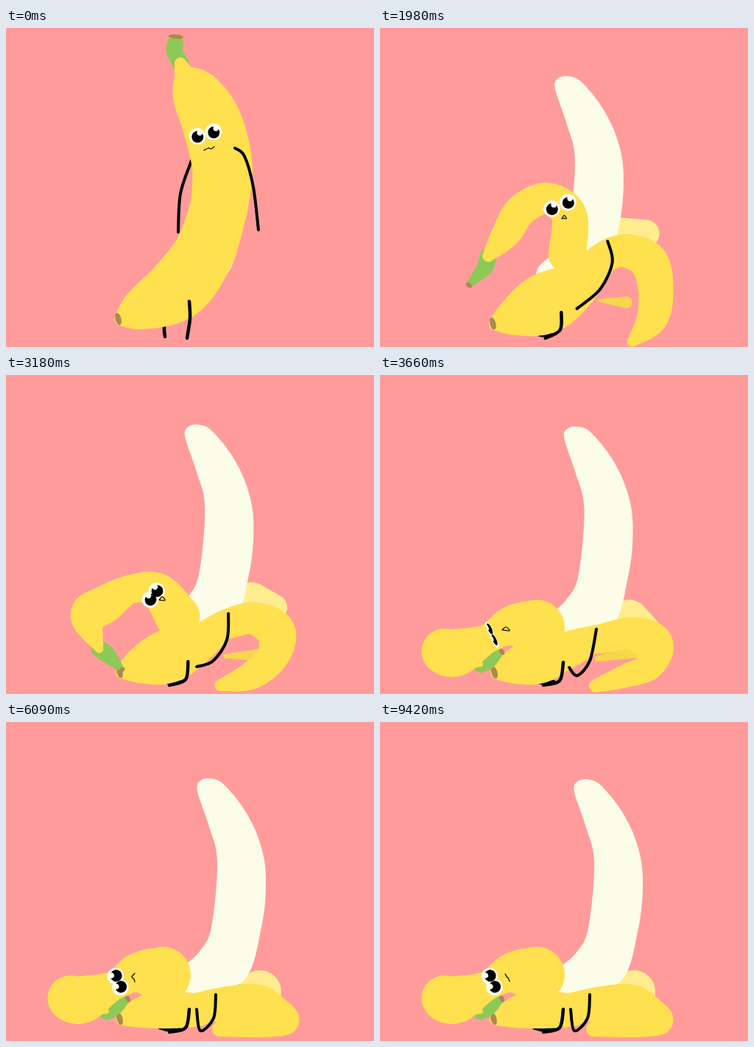
Animation, 500 px wide and 433 px high, one loop 9450 ms. Source, as an HTML page:

```html
<!DOCTYPE html>
<html lang="en">
<head>
<meta charset="utf-8">
<title>Banana</title>
<style>
html, body { margin: 0; width: 100%; height: 100%; overflow: hidden; background: #ff9c9b; }
svg { display: block; width: 100vw; height: 100vh; }
</style>
</head>
<body>
<svg id="stage" viewBox="0 0 500 433"></svg>
<script>
const LOOP = 9450;
const OPEN = 1350, HANG = 2150, DROP = 2850, FALL = 3550, REST = 3720, SETTLE = 5700;
const YELLOW = '#ffe04f', CREAM = '#fbfde9', BROWN = '#a98a50';
const stage = document.getElementById('stage');
const updates = [];

const numbers = text => String(text).match(/-?[\d.]+/g).map(Number);
const degrees = angle => angle * 180 / Math.PI;

function add(tag, attrs) {
  const el = document.createElementNS('http://www.w3.org/2000/svg', tag);
  for (const name in attrs) el.setAttribute(name, attrs[name]);
  return stage.appendChild(el);
}

// Monotone Hermite track: passes smoothly through keys, rests on repeated ones.
function track(keys, parse = numbers) {
  const times = keys.map(k => k[0]);
  const values = keys.map(k => parse(k[1]));
  const last = keys.length - 1;
  const slope = (i, c) => (values[i + 1][c] - values[i][c]) / (times[i + 1] - times[i]);
  const tangent = (i, c) => {
    if (i === 0 || i === last) return 0;
    const a = slope(i - 1, c), b = slope(i, c);
    return a * b <= 0 ? 0 : 2 * a * b / (a + b);
  };
  return t => {
    if (t <= times[0]) return values[0];
    if (t >= times[last]) return values[last];
    const i = times.findIndex(v => v > t) - 1;
    const span = times[i + 1] - times[i], u = (t - times[i]) / span;
    const h = u * u * (3 - 2 * u);
    return values[i].map((v, c) => v + (values[i + 1][c] - v) * h
      + span * u * (1 - u) * ((1 - u) * tangent(i, c) - u * tangent(i + 1, c)));
  };
}

// The story in four poses: whole, hanging open, fallen, settled.
function poses([whole, hang, fallen, settled = fallen], parse) {
  return track([[OPEN, whole], [HANG, hang], [DROP, hang],
    [FALL, fallen], [REST, fallen], [SETTLE, settled]], parse);
}

// A spine of "x,y,radius" joints is blended as lengths and turns, so that peels swing.
function toJoints(text) {
  const v = numbers(text), joints = v.slice(0, 3);
  for (let i = 3, heading = 0; i < v.length; i += 3) {
    const dx = v[i] - v[i - 3], dy = v[i + 1] - v[i - 2];
    const turn = Math.atan2(dy, dx) - heading;
    const wrapped = Math.atan2(Math.sin(turn), Math.cos(turn));
    heading += wrapped;
    joints.push(Math.hypot(dx, dy), wrapped, v[i + 2]);
  }
  return joints;
}

function toSpine(joints) {
  let [x, y, r] = joints, heading = 0;
  const spine = [[x, y, r]];
  for (let i = 3; i < joints.length; i += 3) {
    heading += joints[i + 1];
    x += joints[i] * Math.cos(heading);
    y += joints[i] * Math.sin(heading);
    spine.push([x, y, joints[i + 2]]);
  }
  return spine;
}

function chain(...list) {
  const pose = poses(list, toJoints);
  return t => toSpine(pose(t));
}

// Catmull-Rom point between knots i and i + 1.
function between(knots, i, u) {
  const at = k => knots[Math.max(0, Math.min(knots.length - 1, k))];
  const [a, b, c, d] = [at(i - 1), at(i), at(i + 1), at(i + 2)];
  return b.map((v, k) => v + u / 2 * (c[k] - a[k]
    + u * (2 * a[k] - 5 * v + 4 * c[k] - d[k] + u * (3 * (v - c[k]) + d[k] - a[k]))));
}

// Fills the area a circle covers while it runs along a spine.
function sweep(fill, spineAt) {
  const el = add('path', { fill }), steps = 18;
  updates.push(t => {
    const spine = spineAt(t);
    let d = '';
    for (let s = 0; s <= (spine.length - 1) * steps; s++) {
      const i = Math.min(Math.floor(s / steps), spine.length - 2);
      const [x, y, radius] = between(spine, i, s / steps - i);
      const r = Math.max(1, radius);
      d += `M${x - r} ${y}a${r} ${r} 0 1 0 ${2 * r} 0a${r} ${r} 0 1 0 ${-2 * r} 0`;
    }
    el.setAttribute('d', d);
  });
}

function curve(flat, closed) {
  const n = flat.length / 2;
  const at = i => {
    const k = closed ? (i + n) % n : Math.max(0, Math.min(n - 1, i));
    return [flat[2 * k], flat[2 * k + 1]];
  };
  let d = 'M' + at(0);
  for (let i = 0; i < (closed ? n : n - 1); i++) {
    const [a, b, c, e] = [at(i - 1), at(i), at(i + 1), at(i + 2)];
    d += `C${b.map((v, k) => v + (c[k] - a[k]) / 6)} ${c.map((v, k) => v - (e[k] - b[k]) / 6)} ${c}`;
  }
  return d;
}

function line(width, pose) {
  const el = add('path', { fill: 'none', stroke: '#000', 'stroke-width': width,
    'stroke-linecap': 'round', 'stroke-linejoin': 'round' });
  updates.push(t => el.setAttribute('d', curve(pose(t))));
}

function cap(ovalAt) {
  const el = add('ellipse', { fill: BROWN });
  updates.push(t => {
    const [x, y, rx, ry, turn] = ovalAt(t);
    el.setAttribute('rx', rx);
    el.setAttribute('ry', ry);
    el.setAttribute('transform', `translate(${x} ${y}) rotate(${turn})`);
  });
}

const body = chain(
  '156,395,9 187,380,29 234,353,43 270,303,41 289,245,39',
  '157,402,9 185,392,26 224,376,41 264,357,29 300,335,12',
  '159,404,9 185,395,24 215,388,31 245,377,26 275,365,22',
  '158,403,9 185,394,21 215,390,26 245,391,24 262,391,22');

// Head peel: six joints of skin, then two of stem
const head = chain(
  '289,245,39 294,190,41 281,132,41 261,92,34 245,68,16 237,48,8 229,32,11 230,21,11',
  '250,315,24 252,262,22 222,244,19 192,266,20 180,303,20 164,341,8 164,357,11 152,385,4',
  '213,343,38 180,340,27 146,358,20 103,377,32 88,375,27 137,393,3 148,387,11 162,378,5');

const frontPeel = chain(
  '270,285,8 279,262,20 290,225,22 293,190,26 290,155,24 280,125,21 258,95,7',
  '272,333,8 300,322,20 332,314,22 362,335,26 359,372,24 335,410,21 294,422,7',
  '262,362,16 300,358,20 340,351,22 371,365,27 366,395,19 335,408,16 293,422,9',
  '258,390,22 300,382,23 340,383,27 365,395,23 378,405,20 345,402,26 290,417,10');

const backPeel = chain('300,250,20 300,220,18', '330,283,22 364,290,19',
  '338,333,28 365,345,16', '345,366,29 352,366,22');
const darkTip = chain('285,300,2 295,300,8', '300,379,2 340,382,8',
  '296,385,4 352,375,9', '310,390,4 350,390,9');

function stem(t) {
  const [tip, middle, end] = head(t).slice(5);
  return [[tip[0], tip[1], middle[2]], middle, end];
}
function stemCap(t) {
  const [, [mx, my], [x, y, r]] = stem(t);
  const heading = Math.atan2(y - my, x - mx), reach = r * 0.85;
  return [x + reach * Math.cos(heading), y + reach * Math.sin(heading), r * 0.95, 3,
    degrees(heading) + 90];
}

// Far limbs
line(4, poses(['252,180 237,225 234,277', '262,300 258,340 250,370', '251,331 245,350 235,370']));
line(4.5, poses(['215,404 215,411 216,419', '210,416 221,418 236,416', '209,415 220,418 236,416']));

sweep('#ffec8f', backPeel);
sweep('#f7d64b', darkTip);

// The flesh keeps its shape and slides; the peels cover its foot.
const flesh = add('path', { fill: CREAM, d: curve(numbers(
  '247,370 240,340 266,314 283,280 291,190 279,140 264,95 268,81 282,78 300,86 329,122 349,165 357,212 351,280 325,354'), true) });
const slide = track([[OPEN, '-30,-14'], [2400, '-24,-11.5'], [DROP, '-24,-11.5'],
  [3660, '-13.5,-8'], [6090, '-4,-1.2'], [9420, '0,0']]);
updates.push(t => flesh.setAttribute('transform', `translate(${slide(t)})`));

sweep(YELLOW, body);
cap(t => {
  const [x, y] = body(t)[0];
  return [x - 3.5, y, 4, 8.5, -15];
});
sweep('#8cc957', stem);
cap(stemCap);
sweep(YELLOW, t => head(t).slice(0, 6));
sweep(YELLOW, frontPeel);

// Near limbs
line(4.5, poses(['249,371 250,394 246,421', '246,388 244,412 222,421', '249,390 244,415 222,421']));
const straightArm = '311,163 324,174 336,216 343,274';
const bentArm = '311,163 336,187 346,228 318,272';
const hangingArm = '309,306 313,335 293,371 261,395';
const fallenArm = '294,345 285,388 268,408 257,397';
line(4, track([[500, straightArm], [1200, bentArm], [OPEN, bentArm], [HANG, hangingArm],
  [DROP, hangingArm], [FALL, fallenArm], [REST, fallenArm],
  [SETTLE, '285,370 282,402 264,419 259,390']]));

// Face
const eyes = [
  poses(['260,147', '230,258', '155.5,360']),
  poses(['282,141', '252,249', '149,345'])
];
const turn = poses([0, -7, -115]);
const lid = track([[3150, 1], [3450, 0.33], [3760, 0.33], [3960, 1]]);
function eyePart(fill, r, cx, cy) {
  for (const eye of eyes) {
    const el = add('circle', { fill, r, cx, cy });
    updates.push(t => el.setAttribute('transform',
      `translate(${eye(t)}) rotate(${turn(t)}) scale(1 ${lid(t)})`));
  }
}
eyePart('#fffff5', 11.3, 0, 0);
eyePart('#000', 8, 0.3, 0.8);
eyePart('#fffff5', 3.7, 3.2, -4.8);

const smirk = '270,168 275,165 279,164 282,160';
const gasp = '244,271 247,266 250,271 244,271';
const wince = '166,346 171,342 176,347 166,346';
const pout = '175,341 171,346 174,349 175,353';
line(1.2, track([[600, '269,166 275,163 279,164 283,161'], [1200, smirk], [OPEN, smirk],
  [HANG, gasp], [DROP, gasp], [FALL, wince], [4000, wince], [4700, pout], [6090, pout],
  [7980, '170,342 173,347 174,347 176,352']]));

function frame(now) {
  const t = now % LOOP;
  updates.forEach(update => update(t));
  requestAnimationFrame(frame);
}
frame(0);
</script>
</body>
</html>
```
